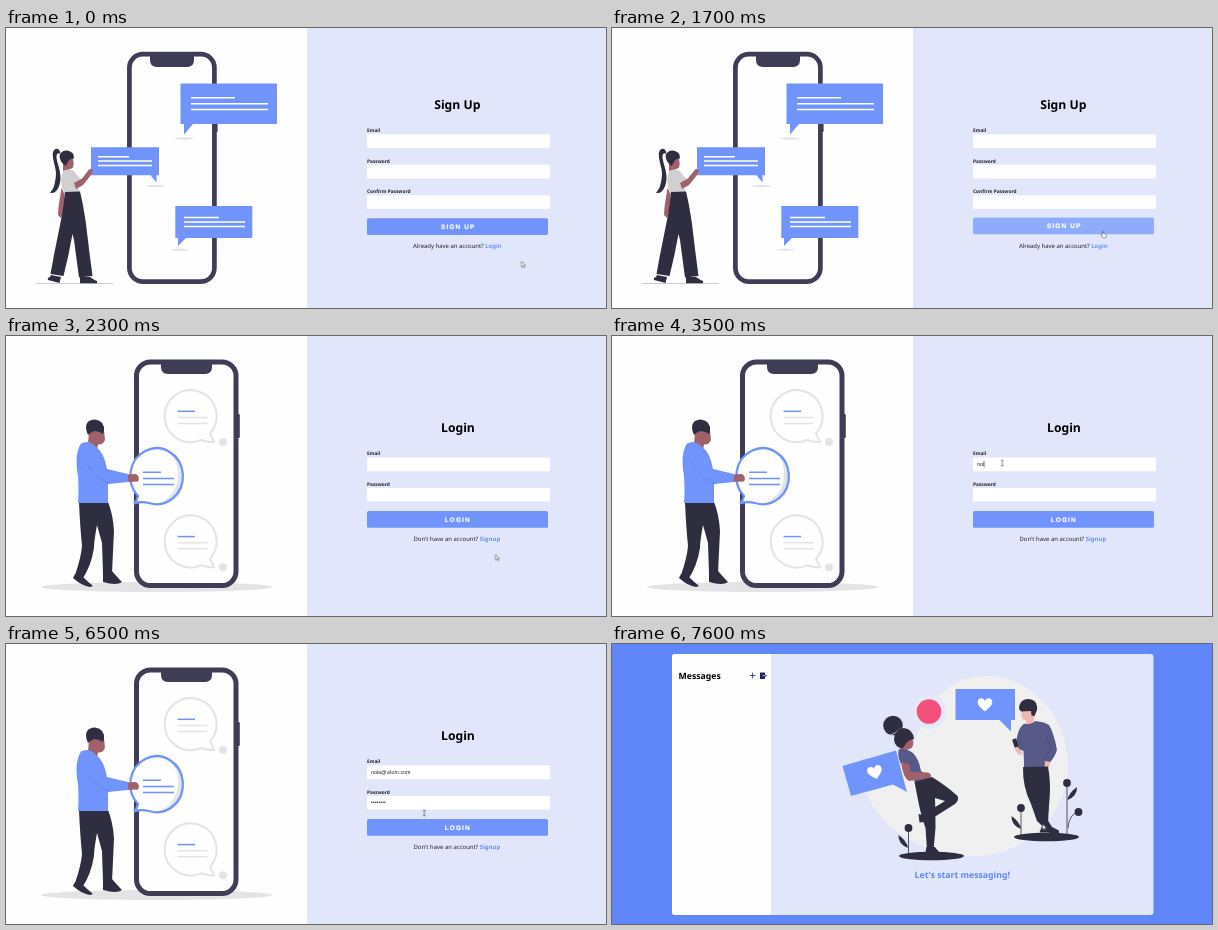
Write an HTML page that moves like this. It is 600 by 280 pixels and loops after 8 s.

```html
<!DOCTYPE html>
<html lang="en">
<head>
<meta charset="utf-8">
<title>Chat sign-in</title>
<style>
  html, body { margin: 0; width: 100%; height: 100%; overflow: hidden; }
  svg { display: block; width: 100vw; height: 100vh; }
  text { font-family: "Noto Sans", "Open Sans", sans-serif; text-rendering: geometricPrecision; }
  .title { font-size: 12.2px; font-weight: 700; }
  .label { font-size: 4.8px; font-weight: 600; fill: #222; }
  .note { font-size: 5.95px; fill: #222; }
  .link { font-weight: 700; fill: #6c91fa; }
  .big { font-size: 8.7px; font-weight: 700; }
  .btn text { font: 700 6.5px "Liberation Sans", Arial, sans-serif; letter-spacing: 1.1px; fill: #fff; stroke: #fff; stroke-width: .2; }
  .typed { font: 5.333px "Liberation Sans", Arial, sans-serif; fill: #222; }
  .blue { fill: #7094fc; }
  .dark { fill: #2f2e41; }
  .skin { fill: #9f616a; }
  .light { fill: #f0b8b3; }
  .shirt { fill: #575a89; }
  .grey { fill: #e4e4e6; }
  .frame { fill: #fefefe; stroke: #3f3d56; }
  .slate { fill: #3f3d56; }
  .rule { fill: none; stroke: #fff; stroke-width: 1.5; }
  .ink { stroke: #7094fc; }
  .pale { stroke: #e4e4e6; }
  .stem { fill: none; stroke: #2f2e41; stroke-width: .8; }

  .t { animation: 8s step-end infinite; }
  .signup { animation-name: signup; }
  .login { animation-name: login; }
  .chat { animation-name: chat; }
  .arrow { animation-name: arrow; }
  .hand { animation-name: hand; }
  .beam { animation-name: beam; }
  .mail { animation-name: mail; }
  .pass { animation-name: pass; }
  .caret1 { animation-name: caret1; }
  .caret2 { animation-name: caret2; }
  .cursor { animation: move 8s linear infinite; }
  .signup .btn { animation: hover1 8s linear infinite; }
  .login .btn { animation: hover2 8s linear infinite; }

  @keyframes signup { 0% { visibility: visible } 26.25%, 100% { visibility: hidden } }
  @keyframes login { 0% { visibility: hidden } 26.25% { visibility: visible } 93.7%, 100% { visibility: hidden } }
  @keyframes chat { 0% { visibility: hidden } 93.7%, 100% { visibility: visible } }

  @keyframes hover1 {
    0%, 18.5% { fill: #7094fc; transform: none }
    20%, 21.5% { fill: #8fabfb; transform: translateY(-.8px) }
    23.5%, 100% { fill: #7094fc; transform: none }
  }
  @keyframes hover2 {
    0%, 34.7% { fill: #7094fc; transform: none }
    36% { fill: #8aa7fb; transform: translateY(-.6px) }
    38%, 82.7% { fill: #7094fc; transform: none }
    85%, 100% { fill: #8fabfb; transform: translateY(-.8px) }
  }

  @keyframes move {
    0%, 10% { transform: translate(515.5px, 233.5px) }
    16% { transform: translate(496px, 218px) }
    20%, 21.25% { transform: translate(490.8px, 202.3px) }
    23.75%, 32.5% { transform: translate(489.5px, 218.5px) }
    40%, 60.2% { transform: translate(390.3px, 127px) }
    62.5%, 81.5% { transform: translate(418.3px, 169px) }
    85%, 100% { transform: translate(430.5px, 180px) }
  }
  @keyframes arrow { 0% { opacity: 1 } 17% { opacity: 0 } 26.25% { opacity: 1 } 34.7% { opacity: 0 } 93.7%, 100% { opacity: 1 } }
  @keyframes hand { 0% { opacity: 0 } 17% { opacity: 1 } 26.25% { opacity: 0 } 34.7% { opacity: 1 } 36.8% { opacity: 0 } 82.7% { opacity: 1 } 93.7%, 100% { opacity: 0 } }
  @keyframes beam { 0% { opacity: 0 } 36.8% { opacity: 1 } 82.7%, 100% { opacity: 0 } }

  /* white cover with the caret on its left edge, stepped one letter at a time */
  @keyframes mail {
    0% { transform: none }
    41% { transform: translateX(2.97px) }
    42.25% { transform: translateX(5.93px) }
    43.5% { transform: translateX(7.11px) }
    46% { transform: translateX(10.08px) }
    49.75% { transform: translateX(15.49px) }
    52.25% { transform: translateX(18.16px) }
    53.5% { transform: translateX(19.34px) }
    56% { transform: translateX(20.53px) }
    57.25% { transform: translateX(23.49px) }
    58.5% { transform: translateX(27.93px) }
    59.1% { transform: translateX(29.42px) }
    59.75% { transform: translateX(32.08px) }
    61% { transform: translateX(35.05px) }
    62.25%, 100% { transform: translateX(39.9px) }
  }
  @keyframes pass {
    0% { transform: none }
    68.5% { transform: translateX(1.87px) }
    69.2% { transform: translateX(3.73px) }
    69.8% { transform: translateX(5.6px) }
    71% { transform: translateX(7.47px) }
    72.25% { transform: translateX(9.33px) }
    74.75% { transform: translateX(11.2px) }
    76% { transform: translateX(13.07px) }
    77.25%, 100% { transform: translateX(15.2px) }
  }
  @keyframes caret1 { 0% { opacity: 0 } 40% { opacity: 1 } 64.75%, 100% { opacity: 0 } }
  @keyframes caret2 { 0% { opacity: 0 } 64.75% { opacity: 1 } 79.8%, 100% { opacity: 0 } }
</style>
</head>
<body>
<svg viewBox="0 0 600 280">
  <defs>
    <path id="heart" fill="#fff" d="M0 7C-4 3.5-7.3 1-7.3-2.4C-7.3-7-2-7.6 0-3.8C2-7.6 7.3-7 7.3-2.4C7.3 1 4 3.5 0 7Z"/>
    <path id="leaf" class="dark" d="M0 0Q-1-7-9.500-13Q-10-4 0 0Z"/>
    <g id="ring">
      <path d="M204 97.5A26 26 0 1 0 195 104Q202 106.5 208 106Z" fill="#fefefe" stroke="#e4e4e6" stroke-width="2"/>
      <circle class="grey" cx="217" cy="106" r="4"/>
      <path class="rule ink" d="M171.5 75.3H189"/>
      <path class="rule pale" d="M171.5 81.4H201.5M171.5 87.4H201.5"/>
    </g>
  </defs>

  <rect width="600" height="280" fill="#fefefe"/>
  <rect x="301" width="299" height="280" fill="#e1e6fa"/>

  <g class="t signup">
    <rect class="slate" x="209" y="79" width="2.6" height="25" rx="1"/>
    <rect class="frame" x="123.400" y="26.200" width="85" height="227.400" rx="13.500" stroke-width="4.700"/>
    <path class="slate" d="M144 25H188V32Q188 39 181 39H151Q144 39 144 32Z"/>
    <g class="grey">
      <ellipse cx="178" cy="110.5" rx="10" ry="1.2"/>
      <ellipse cx="149.5" cy="158" rx="10" ry="1.2"/>
      <ellipse cx="173.5" cy="221.7" rx="8.5" ry="1.1"/>
    </g>
    <path class="blue" d="M174.500 55.500H271V96H187L178 106.500V96H174.500Z"/>
    <path class="rule" d="M185 69.800H229M185 75.700H262M185 81.500H262"/>
    <path class="blue" d="M85 119.300H153V147.300H150.500V154.500L144.500 147.300H85Z"/>
    <path class="rule" d="M92 128.700H123M92 133.100H146M92 137.400H146"/>
    <path class="blue" d="M169.300 178H246.300V210H180L172 218V210H169.300Z"/>
    <path class="rule" d="M178 189.500H213M178 194H239M178 198.600H239"/>
    <path d="M30 255.500H107" stroke="#bfbfc6" stroke-width=".8"/>
    <path class="skin" d="M55.500 160L52.500 179L52 187L55 190L57 186L58.500 166Z"/>
    <path class="dark" d="M54.500 126C54 118.500 46.500 119 46.800 127C47 135 51.500 142 49.500 151C48.500 158 47 162 44 164.500C49 167 54 160 54.500 151C55 141 50 134 50.500 127.500Q51.500 124 54.500 126Z"/>
    <path class="skin" d="M57 131L66.500 130Q68.500 135 67 139.500Q64.500 141.500 63 141L63 146L57 144Z"/>
    <path class="dark" d="M53.500 128Q55 122.300 61 122.500Q68.500 123.500 68 130.500Q63.500 130 62 134L59.500 138Q54 134 53.500 128Z"/>
    <path d="M57 143Q66 139 70 146L75.500 152L72 157L74 165.500H58Q53 153 57 143Z" fill="#d0cfd1"/>
    <path class="skin" d="M68 155L76 150.500L83 141.500Q86 140 87 143L85 147L77 157L70 161Z"/>
    <path class="dark" d="M59 164L74 163.500Q77.500 178 80 196Q83 222 86.500 248L73 249.500L68 212L66.500 206Q63 226 57.500 248L44.500 246Q48 226 52 207Q57 186 59 164Z"/>
    <path class="dark" d="M45 247L55 249L53.500 255L42 252Q41 250 44 249ZM74 249H84Q88 252 91 253V255.300H74Z"/>

    <text class="title" x="428.2" y="81">Sign Up</text>
    <text class="label" x="361" y="104.2">Email</text>
    <text class="label" x="361" y="134.7">Password</text>
    <text class="label" x="361" y="165.2">Confirm Password</text>
    <g fill="#fdfdfe">
      <rect x="361" y="106.3" width="183" height="13.7" rx="1"/>
      <rect x="361" y="136.8" width="183" height="13.7" rx="1"/>
      <rect x="361" y="167.2" width="183" height="13.7" rx="1"/>
    </g>
    <g class="btn">
      <rect x="361" y="190.3" width="181" height="16.8" rx="1.6"/>
      <text x="435" y="200.9">SIGN UP</text>
    </g>
    <text class="note" x="407" y="220.4">Already have an account? <tspan class="link">Login</tspan></text>
  </g>

  <g class="t login">
    <ellipse class="grey" cx="150.5" cy="251" rx="115.5" ry="5"/>
    <rect class="slate" x="231" y="78" width="2.8" height="24" rx="1"/>
    <rect class="frame" x="130.5" y="26" width="99.5" height="223.5" rx="14" stroke-width="5"/>
    <path class="slate" d="M155 25H206V31Q206 38 199 38H162Q155 38 155 31Z"/>
    <use href="#ring"/>
    <use href="#ring" y="125.3"/>
    <path d="M132 160A26.3 28 0 1 1 143 167Q135 165 128 167.5Q131 165 132 160Z" fill="#fefefe"/>
    <path d="M158 114Q173 120 172 141Q170 161 151 168Q178 168 178 141Q176 116 158 114Z" fill="#e4e4e6"/>
    <path d="M132 160A26.3 28 0 1 1 143 167Q135 165 128 167.5Q131 165 132 160Z" fill="none" stroke="#7094fc" stroke-width="2.3"/>
    <path class="rule ink" d="M137 136.3H155M137 142.5H168M137 148.6H168"/>
    <path class="skin" d="M83 96L98 94L99 104Q97 109 92 108.5L91 114L82 108Z"/>
    <path class="dark" d="M80.5 95Q78 84 89 83.5Q99 85 98 95L97 98Q89 92 82 99Z"/>
    <path class="dark" d="M73 166H102Q107 178 108 195L106 237L97 238L96 207L91 189Q88 205 88 212Q85 230 77 242L69 239Q75 222 76 210Q74 190 73 166Z"/>
    <path class="dark" d="M69 238L77 241Q82 246 87 250L84 251Q76 250 67 242ZM97 237L106 235Q112 242 116 246Q111 250 97 246Z"/>
    <path class="skin" d="M120 138.5L130 138Q134.5 141 132 145.5L120 146Z"/>
    <path class="blue" d="M75 107.5Q83 103 90 111Q98 116 101 133L122 138V146L102 148V167H72Q73 155 72 140Q68 118 75 107.5Z"/>
    <path d="M80 127Q90 143 104 148" fill="none" stroke="#5b7cda" stroke-width=".6"/>

    <text class="title" x="435" y="96.4">Login</text>
    <text class="label" x="361" y="119.4">Email</text>
    <text class="label" x="361" y="149.9">Password</text>
    <g fill="#fff">
      <rect x="361" y="121.5" width="183" height="13.7" rx="1"/>
      <rect x="361" y="151.9" width="183" height="13.7" rx="1"/>
    </g>
    <text class="typed" x="365" y="130">nola@vilom.com</text>
    <g class="t mail">
      <rect x="365" y="124" width="55" height="9" fill="#fff"/>
      <path class="t caret1" d="M365.2 125V131.5" stroke="#333" stroke-width=".5"/>
    </g>
    <text class="typed" x="365" y="160.4">••••••••</text>
    <g class="t pass">
      <rect x="365" y="154" width="40" height="9" fill="#fff"/>
      <path class="t caret2" d="M365.2 155.5V162" stroke="#333" stroke-width=".5"/>
    </g>
    <g class="btn">
      <rect x="361" y="175" width="181" height="16.8" rx="1.6"/>
      <text x="438.7" y="185.7">LOGIN</text>
    </g>
    <text class="note" x="407.5" y="205">Don't have an account? <tspan class="link">Signup</tspan></text>
  </g>

  <g class="t chat">
    <rect width="600" height="280" fill="#6087fa"/>
    <rect x="60" y="10" width="481.5" height="261" rx="3" fill="#e1e6fa"/>
    <path d="M159 10H63Q60 10 60 13V268Q60 271 63 271H159Z" fill="#fefefe"/>
    <text class="big" x="66.6" y="35">Messages</text>
    <path d="M137.7 31.5H143.5M140.6 28.6V34.4" stroke="#25235f" stroke-width=".8"/>
    <path d="M148 28.5H153V30.5L155.3 31.7L153 33V35H148Z" fill="#25235f"/>
    <path d="M150.5 31.7H154" stroke="#fff" stroke-width=".6"/>

    <path d="M374 32C419 32 456 72 456 121C456 170 415 212 362 212C318 212 266 188 254 146C262 128 290 132 300 105C312 70 328 32 374 32Z" fill="#f0f0f1"/>
    <circle cx="317" cy="67.5" r="17.5" fill="#e4e8f8"/>
    <circle cx="317" cy="67.5" r="12.3" fill="#f3507e"/>
    <path class="blue" d="M343.5 45H403V76H399V87.5L387.5 76H343.5Z"/>
    <use href="#heart" x="373" y="60.5"/>
    <path class="blue" d="M230.5 122L284 106.5L292 137L295 148L281 140.5L239 152Z"/>
    <use href="#heart" transform="translate(263 128.3) rotate(-15)"/>

    <g class="dark">
      <ellipse cx="319.5" cy="212" rx="32.5" ry="4.3"/>
      <ellipse cx="434.5" cy="193" rx="32.5" ry="4.3"/>
      <circle cx="296.5" cy="184" r="3.9"/>
      <circle cx="409" cy="164" r="3.9"/>
      <circle cx="455" cy="139" r="3.9"/>
      <circle cx="466.5" cy="168" r="3.9"/>
    </g>
    <path class="stem" d="M296.5 184V211M409 164V191M455 139V192M466.5 168Q457 170 456 184"/>
    <use href="#leaf" x="296" y="204"/>
    <use href="#leaf" x="409" y="185"/>
    <use href="#leaf" transform="translate(455.5 156) scale(-1 1)"/>

    <circle class="dark" cx="281" cy="81.5" r="9.8"/>
    <path d="M274.5 91.5Q283 91 288 84.500" fill="none" stroke="#e4e6f4" stroke-width=".8"/>
    <path class="skin" d="M290 94L300 94Q302.500 99 300 103.500Q297 106 295.500 105L296 109L288 107Z"/>
    <path class="dark" d="M282 95.500Q282.500 85 291.500 84Q301 85 302 95Q297 95.500 294.500 99L290.500 104.500Q282.500 103 282 95.500Z"/>
    <path class="shirt" d="M287 105Q296 105 301 109Q307 115 309 127L319 134L303.500 139L296 126L288.500 119Q285 111 287 105Z"/>
    <path class="skin" d="M289 118L297 120L299 128L316 128.500Q321 131 318 134L297 137Q291 134 289 118Z"/>
    <path class="dark" d="M302.500 138L320 133Q336 143 345.500 152Q347.500 156 343 160L324 172L310 178L307 173L320 165L333 157L323 154Q323.500 170 323.500 184L321.500 206H315L313.500 184Q309 172 306 156Z"/>
    <path class="dark" d="M306.5 170L312 171.500V178L307.500 178.500ZM314.500 203H323Q326 208 333 211.500V213H312.500Z"/>

    <path class="light" d="M409.500 65L420 64L422.500 71L422 80L414 81.500V76Q409.500 77 409.500 71Z"/>
    <path class="dark" d="M407 65Q407 55.500 416 55Q426 55.500 425 66L422.500 72L419.500 71.500L419 67L409 67.500Z"/>
    <path class="shirt" d="M412 79.500Q418 82 423.500 77Q433 78 437 81Q442 89 445 106Q442 115 437 119L436 124H412Q412 116 411.500 107L404 104Q404 92 408 84Z"/>
    <path class="light" d="M402 99L407.500 105L411 110L407 111L403 106ZM433 117L438.500 118L437 123L432.500 124Z"/>
    <rect class="dark" x="401.3" y="94.500" width="4.3" height="8.500" rx="1" transform="rotate(-18 404 99)"/>
    <path d="M434 91Q439 101 438 106L432 116" fill="none" stroke="#454871" stroke-width=".7"/>
    <path class="dark" d="M411 123L436 122.500Q439 138 437.500 156L435.500 176L440 183L447 186.500V189H437.500L425 177L419 160Q410.500 143 411 123Z"/>
    <path class="dark" d="M427 145L437 152L436 184L438 188.500H427.500L430 182Z"/>
    <text class="big" x="302.6" y="234" fill="#5f86f5">Let's start messaging!</text>
  </g>

  <g class="cursor" stroke-linejoin="round">
    <path class="t arrow" d="M0 0V5.6L1.4 4.4L2.3 6.3L3.2 5.9L2.3 4H4Z" fill="#fff" stroke="#333" stroke-width=".5"/>
    <path class="t hand" d="M-.5 .8Q0 0 .6 .8V3L3.2 3.6Q3.7 4 3.5 5.5L3 7.4H0L-1.9 4.6Q-1.6 3.7-.5 4.6Z" fill="#fff" stroke="#333" stroke-width=".5"/>
    <path class="t beam" d="M-1.2-2.8H1.2M0-2.8V2.8M-1.2 2.8H1.2" fill="none" stroke="#333" stroke-width=".6"/>
  </g>
</svg>
</body>
</html>
```
